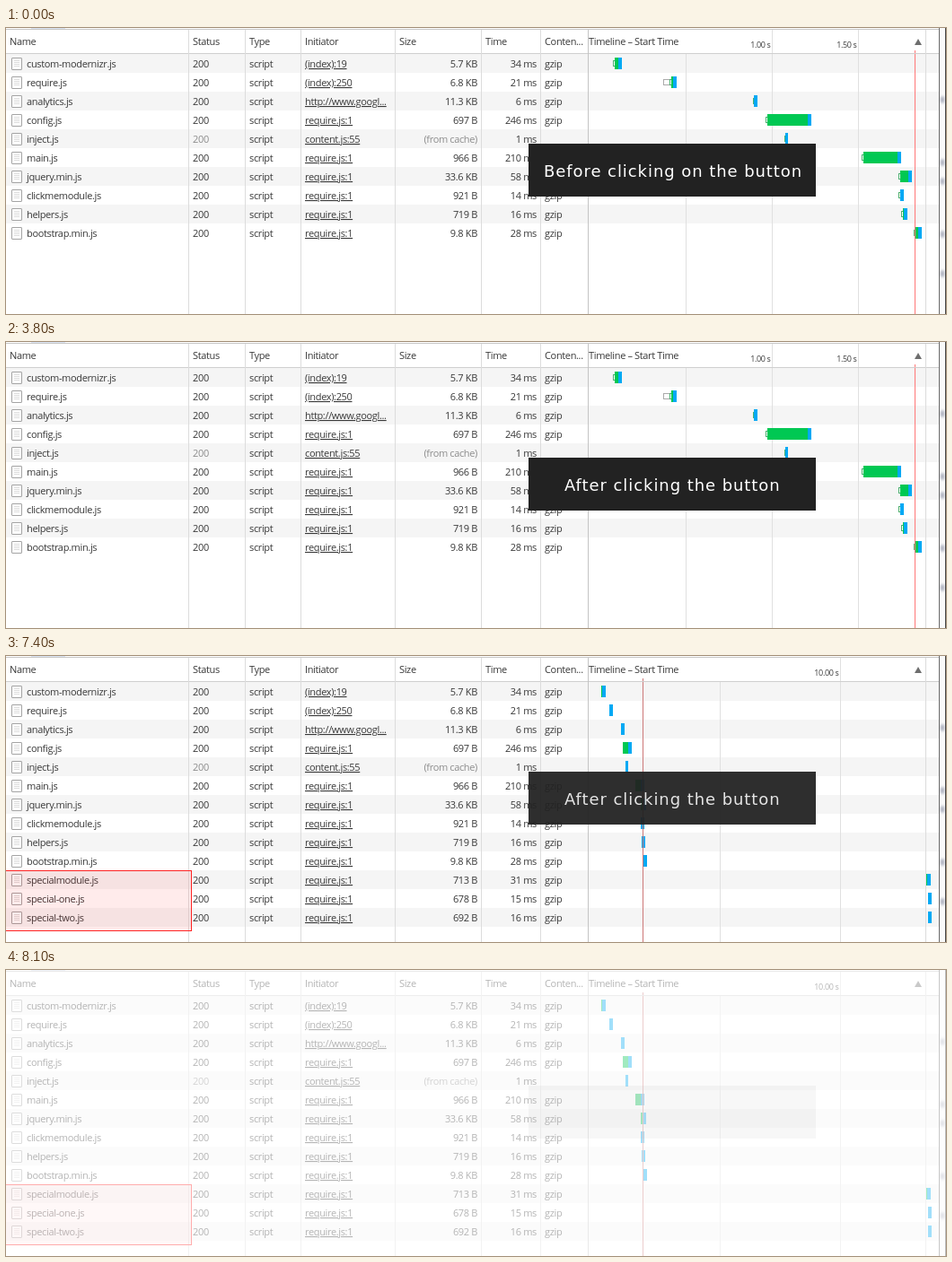
Animation, 1047 px wide and 319 px high, one loop 8200 ms. Source, as an HTML page:

```html
<!DOCTYPE html>
<html lang="en">
<head>
<meta charset="utf-8">
<title>Network panel</title>
<style>
html, body { margin: 0; width: 100%; height: 100%; overflow: hidden; background: #fff; }
svg { display: block; width: 100%; height: 100%; }
text { font: 11px "Open Sans", "Noto Sans", sans-serif; letter-spacing: -.35px; fill: #383838; white-space: pre; }
.dim { fill: #8c8c8c; }
.link { text-decoration: underline; }
.end { text-anchor: end; }
.tick { font-size: 9px; }
.note { font: 18px "DejaVu Sans", Verdana, sans-serif; letter-spacing: .93px; fill: #fff; }
</style>
</head>
<body>
<svg viewBox="0 0 1047 319">
  <defs>
    <filter id="soft" x="-100%" y="-100%" width="300%" height="300%"><feGaussianBlur stdDeviation="1.6"/></filter>
  </defs>
  <g id="page"></g>
</svg>
<script>
const LOOP = 8200, ROW = 21, TOP = 29, RIGHT = 1039;
const ORIGIN = 660.7, LOADED = 1.83;
const GREEN = '#00c853', BLUE = '#03a9f4', GRID = '#e0e0e0';
const page = document.getElementById('page');

function add(parent, tag, attrs, content) {
  const el = document.createElementNS('http://www.w3.org/2000/svg', tag);
  for (const k in attrs) el.setAttribute(k, attrs[k]);
  if (content !== undefined) el.textContent = content;
  parent.appendChild(el);
  return el;
}
const group = parent => add(parent, 'g', {});
const rect = (p, x, y, width, height, fill, more) => add(p, 'rect', { x, y, width, height, fill, ...more });
const text = (p, x, y, content, cls = '') => add(p, 'text', { x, y, class: cls }, content);
const vline = (p, x, y, fill) => rect(p, x, y, 1, 319 - y, fill);
const rowY = i => TOP + i * ROW;

// name, size, duration in ms, start in s, initiator
const files = [
  ['custom-modernizr.js', '5.7 KB', 34, .08, '(index):19'],
  ['require.js', '6.8 KB', 21, .41, '(index):250'],
  ['analytics.js', '11.3 KB', 6, .89, 'http://www.googl...'],
  ['config.js', '697 B', 246, .965],
  ['inject.js', '(from cache)', 1, 1.075, 'content.js:55'],
  ['main.js', '966 B', 210, 1.52],
  ['jquery.min.js', '33.6 KB', 58, 1.735],
  ['clickmemodule.js', '921 B', 14, 1.735],
  ['helpers.js', '719 B', 16, 1.75],
  ['bootstrap.min.js', '9.8 KB', 28, 1.825],
  ['specialmodule.js', '713 B', 31, 13.6],
  ['special-one.js', '678 B', 15, 13.67],
  ['special-two.js', '692 B', 16, 13.67]
].map(([name, size, ms, start, from = 'require.js:1']) => ({ name, size, ms, start, from }));

const columns = [
  [-1, 'Name'], [203, 'Status'], [266, 'Type'], [328, 'Initiator'],
  [433, 'Size'], [529, 'Time'], [595, 'Conten...'], [648, 'Timeline – Start Time']
];

function drawIcon(p, y) {
  rect(p, 6.5, y + 4.5, 11, 13, '#fff', { stroke: '#a4a4a4', rx: .5 });
  for (let i = 0; i < 4; i++) rect(p, 9, y + 7 + i * 2, 6, 1, '#dcdcdc');
}

function drawRow(p, file, i) {
  const y = rowY(i), base = y + 15;
  const cached = file.size.includes('cache');
  const tone = cached ? ' dim' : '';
  drawIcon(p, y);
  text(p, 23, base, file.name);
  text(p, 208, base, '200', tone);
  text(p, 271, base, 'script');
  text(p, 333, base, file.from, 'link');
  text(p, 525, base, file.size, 'end' + tone);
  text(p, 591, base, file.ms + ' ms', 'end');
  if (!cached) text(p, 600, base, 'gzip');
}

function drawGrid(p, scale, step) {
  for (let s = step, x; (x = Math.round(ORIGIN + s * scale)) < 1000; s += step) {
    vline(p, x, s > step ? 2 : TOP, GRID);
    if (s > step) text(p, x - 1.5, 22, s.toFixed(2) + ' s', 'end tick');
  }
}

// Bar length follows the duration, plus a fixed blue end; wide scales also show the wait.
function drawBars(p, list, scale, lineColor) {
  const wait = scale > 100 ? 2 : 0;
  list.forEach(({ start, ms }, i) => {
    const x = ORIGIN + start * scale, end = x + ms / 1000 * scale + 3.8;
    const left = Math.round(x), split = Math.round(end - 4), right = Math.round(end), y = rowY(i) + 4;
    if (wait) rect(p, left + .5, y + 3.5, wait, 6, '#fff', { stroke: '#4caf70' });
    rect(p, left + wait, y, Math.max(0, split - left - wait), 13, GREEN);
    rect(p, Math.max(split, left + wait / 2), y, right - Math.max(split, left + wait / 2), 13, BLUE);
  });
  vline(p, Math.floor(ORIGIN + LOADED * scale), 25, lineColor);
}

function drawFrame(p) {
  rect(p, 0, 1, RIGHT, 1, '#c8c8c8');
  rect(p, 28, 0, 38, 1, '#dbe4f4');
  rect(p, 0, 28, RIGHT, 1, '#cfcfcf');
  columns.forEach(([x, title], i) => {
    const last = i === columns.length - 1;
    vline(p, x, 2, last ? '#c4c4c4' : '#dcdcdc');
    text(p, x + (last ? 1 : 5), 19, title);
  });
  vline(p, 1024, 2, '#dcdcdc');
  add(p, 'path', { d: 'M1012 19L1016 12L1020 19Z', fill: '#6e6e6e' });
  rect(p, RIGHT + 1, 0, 6, 319, '#fafafa');
  for (const cy of [80, 150, 171, 230, 274])
    add(p, 'ellipse', { cx: 1043, cy, rx: 2, ry: 4, fill: '#a4a8b8', filter: 'url(#soft)' });
  vline(p, RIGHT, 0, '#6a6a6a');
  vline(p, 1046, 0, '#444');
}

for (let i = 0; i < files.length; i += 2) rect(page, 0, rowY(i), RIGHT, ROW, '#f5f5f5');

const firstFiles = files.slice(0, 10);
const early = group(page), late = group(page);

rect(early, 0, rowY(10), RIGHT, 3 * ROW, '#fff');
drawGrid(early, 192, .5);
rect(early, 732.5, rowY(1) + 7.5, 9, 6, '#fff', { stroke: '#aaa' });
drawBars(early, firstFiles, 192, '#f77');

drawGrid(late, 26.8, 5);
files.slice(10).forEach((f, i) => drawRow(late, f, i + 10));
drawBars(late, files, 26.8, '#c77');

drawFrame(page);
firstFiles.forEach((f, i) => drawRow(page, f, i));

const mark = rect(page, -1, 239.5, 207.5, 67, '#f00', { 'fill-opacity': .08, stroke: '#f22' });

const label = group(page);
rect(label, 582, 129, 320, 59, '#222');
const noteA = text(label, 599, 166, 'Before clicking on the button', 'note');
const noteB = text(label, 622, 166, 'After clicking the button', 'note');

const clamp = v => Math.max(0, Math.min(1, v));
const fade = (el, v) => el.setAttribute('opacity', v);
const show = (el, on) => el.setAttribute('display', on ? 'inline' : 'none');

// Two blinks, the second one fading in to stay.
function markLevel(t) {
  if (t < 4100) return 0;
  if (t < 4700) return t >= 4300 && t < 4500 ? 0 : 1;
  return clamp((t - 4700) / 200);
}

function draw(time) {
  const t = Math.floor((time % LOOP) / 100) * 100;
  show(early, t < 3900);
  show(late, t >= 3900);
  fade(mark, markLevel(t));

  const out = clamp((t - 7300) / 800);
  fade(noteA, clamp(1 - (t - 2400) / 700));
  fade(noteB, clamp((t - 3200) / 600) * (1 - out));
  fade(label, 1 - .9 * out ** 1.3);
  fade(page, 1 - .63 * clamp((t - 7600) / 500) ** 1.2);
}

const start = performance.now();
function tick() {
  draw(performance.now() - start);
  requestAnimationFrame(tick);
}
draw(0);
requestAnimationFrame(tick);
</script>
</body>
</html>
```
